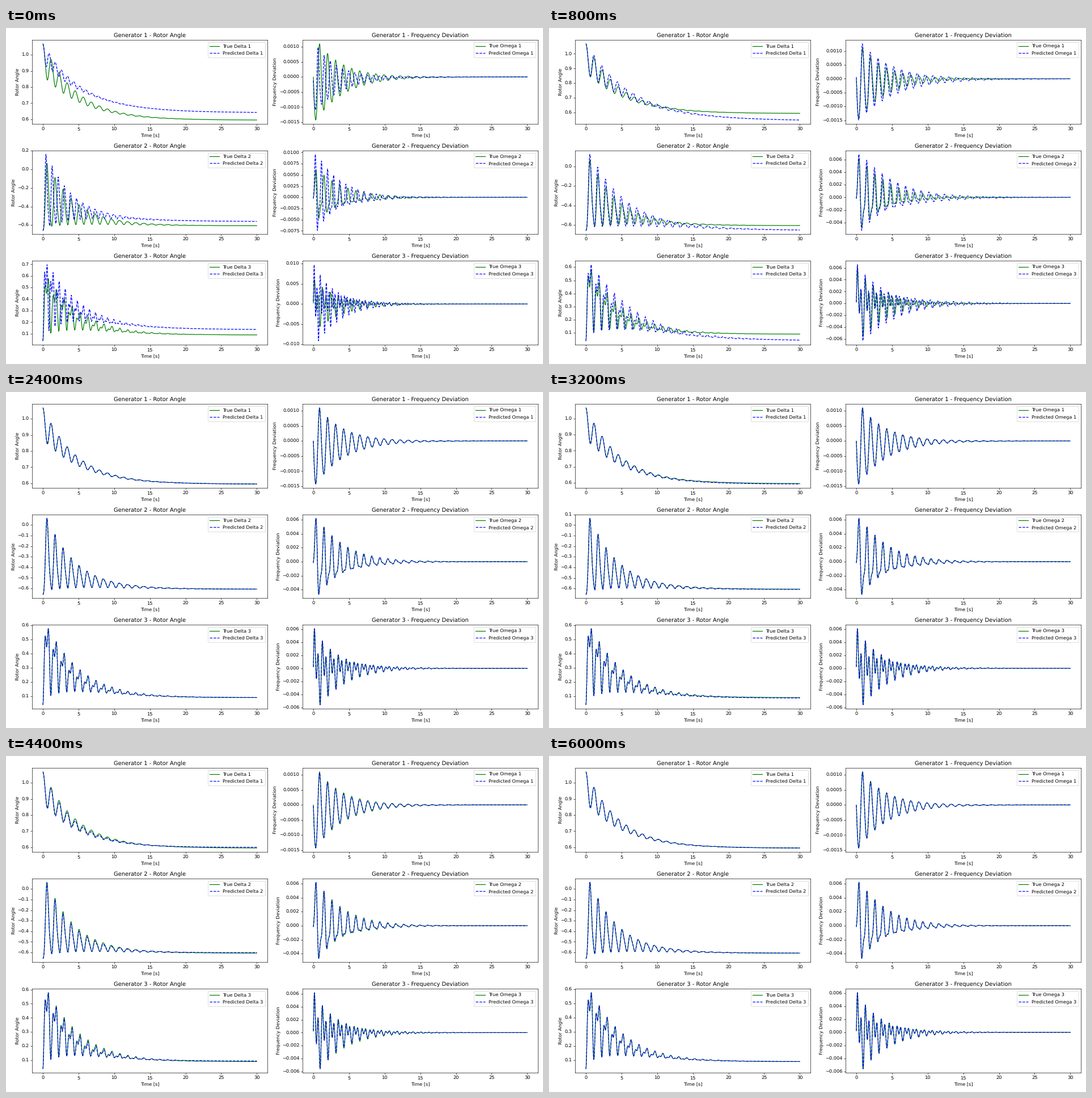
These frames come from a looping animation (947x592 px, 7.5 s). A matplotlib script:

```python
import numpy as np
import matplotlib.pyplot as plt
from matplotlib.animation import FuncAnimation

WIDTH, HEIGHT, DPI = 947, 592, 59.2
INTERVAL, FRAMES, HOLD, LAST = 100, 75, 4, 15
SYNC_SPEED = 377.0
SLOW_RATE, FAST_RATE = 5.56, 11.31
TREND_DECAY, SWING_DECAY = 0.203, 0.27

plt.rcParams.update({"font.family": "DejaVu Sans", "text.hinting": "none"})
t = np.linspace(0, 30, 1000)
settle = np.exp(-3 * t**2)

MACHINES = [
    dict(start=1.0675, final=0.5945, slow=-0.101, lag=(0.27, 0.27),
         fast=0.004, phase=-1.57, sag=0.01),
    dict(start=-0.656, final=-0.607, slow=0.395, lag=(0, 0.28),
         fast=-0.07, phase=0.095, sag=0.06),
    dict(start=0.04, final=0.09, slow=0.22, lag=(0.1, 0.14),
         fast=0.145, phase=0.095, sag=0.04),
]

# Peak errors of the prediction; each grows and fades over two training stages.
ERRORS = {
    0: dict(shift=0.046, trend=-0.14, damp=0.11, freq=0.31,
            first=-0.39, rest=0.12, fast=0.30),
    2: dict(shift=-0.050, trend=-0.28, damp=-0.20, freq=0.027,
            first=0.03, rest=0.06, fast=0.03),
    8: dict(shift=-0.003, damp=-0.03, freq=-0.003),
    10: dict(shift=0.0095, trend=0.20, damp=0.15, fast=0.08),
}


def error_at(stage, name):
    return sum(max(0, 1 - abs(stage - peak) / 2) * error.get(name, 0)
               for peak, error in ERRORS.items())


def rotor_angle(index, stage):
    """Decaying trend plus a slow and a fast damped oscillation."""
    m = MACHINES[index]
    freq = 1 + error_at(stage, "freq")
    slow = m["slow"] * (1 + error_at(stage, "rest" if index else "first"))
    fast = m["fast"] * (1 + error_at(stage, "fast"))
    final = m["final"] + error_at(stage, "shift")
    trend = TREND_DECAY * (1 + error_at(stage, "trend"))
    damp = SWING_DECAY * (1 + error_at(stage, "damp"))

    early, late = m["lag"]
    lag = late + (early - late) * settle
    swing = -np.exp(-damp * t) * (
        slow * np.cos(SLOW_RATE * freq * t - lag)
        + fast * np.cos(FAST_RATE * freq * t + m["phase"]))
    offset = m["start"] - final - swing[0] + m["sag"]
    return final + offset * np.exp(-trend * t) - m["sag"] * settle + swing


def responses(stage):
    """Angle and frequency deviation of each machine, in panel order."""
    curves = []
    for index in range(3):
        angle = rotor_angle(index, stage)
        curves += [angle, np.gradient(angle, t, edge_order=2) / SYNC_SPEED]
    return curves


def make_panel(index, truth):
    row, col = divmod(index, 2)
    left = 46.2 + 477 * col
    bottom = HEIGHT - (168.8 + 194.5 * row)
    ax = fig.add_axes([left / WIDTH, bottom / HEIGHT, 414.9 / WIDTH, 147.5 / HEIGHT])
    quantity, symbol = (("Rotor Angle", "Delta"), ("Frequency Deviation", "Omega"))[col]
    number = row + 1
    ax.plot(t, truth, color="green", label=f"True {symbol} {number}")
    line, = ax.plot(t, truth, "--", color="blue",
                    label=f"Predicted {symbol} {number}")
    ax.set_title(f"Generator {number} - {quantity}")
    ax.set_xlabel("Time [s]")
    ax.set_ylabel(quantity)
    ax.legend(loc="upper right")
    return ax, line


fig = plt.figure(figsize=((WIDTH + 0.001) / DPI, (HEIGHT + 0.001) / DPI),
                 dpi=DPI, facecolor="white")
panels = [make_panel(i, curve) for i, curve in enumerate(responses(LAST))]


def update(frame):
    stage = min(frame // HOLD, LAST)
    for (ax, line), curve in zip(panels, responses(stage)):
        line.set_ydata(curve)
        ax.relim()
        ax.autoscale_view()
    return [line for _, line in panels]


animation = FuncAnimation(fig, update, frames=FRAMES, interval=INTERVAL,
                          repeat=True, repeat_delay=0, blit=False)
plt.show()
```
